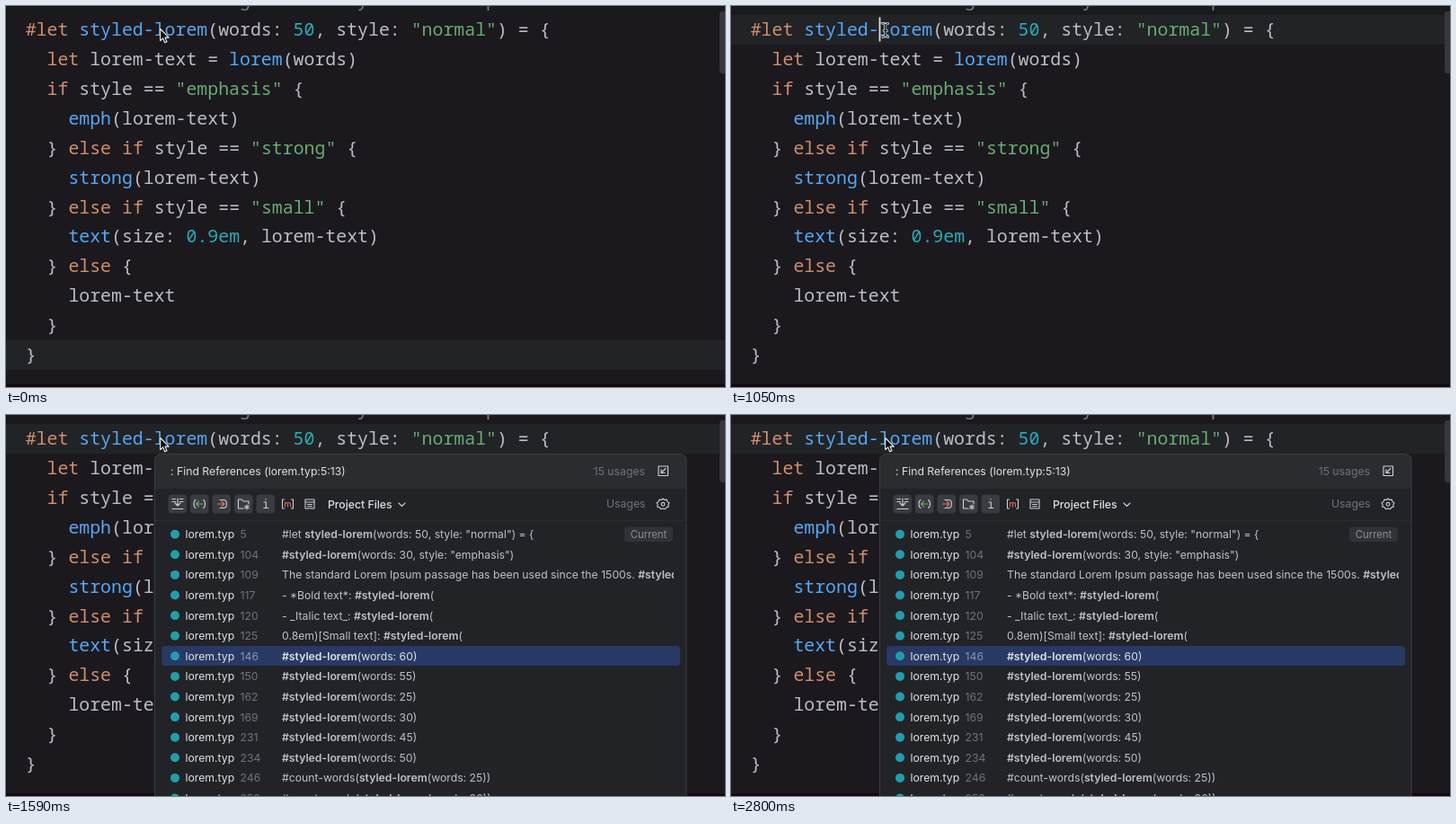
Animation, 800 px wide and 424 px high, one loop 2.84 s. Source, as an HTML page:

```html
<!DOCTYPE html>
<html lang="en">
<head>
<meta charset="utf-8">
<style>
  html, body { margin: 0; width: 100%; height: 100%; overflow: hidden; background: #1b191e; }
  svg { display: block; }
  text { white-space: pre; }
  #code { font: 500 19.87px "Noto Sans Mono", monospace; fill: #bcbec4; }
  #popup { font: 12.24px Inter, sans-serif; fill: #bfc1c7; }
  .bold { font-weight: 600; }
  .dim { fill: #6f737a; }
  .icon { fill: none; stroke: #ced0d6; stroke-width: 1.1; stroke-linecap: round; stroke-linejoin: round; }
  .green { stroke: #5fad65; }
  .orange { stroke: #e0784f; }
</style>
</head>
<body>
<svg width="800" height="424" viewBox="0 0 800 424">
  <rect width="800" height="424" fill="#1b191e"/>
  <rect id="line" width="800" height="33" fill="#212326"/>
  <rect y="421" width="800" height="3" fill="#110b0f"/>
  <g id="code"></g>
  <rect x="794" y="6" width="8" height="69" rx="3" fill="#37373b"/>

  <g id="popup">
    <rect x="165.5" y="43.5" width="591.5" height="400" rx="7" fill="#212327"/>
    <path d="M165.5 82V50.5a7 7 0 0 1 7-7H750a7 7 0 0 1 7 7V82z" fill="#2a2c2f"/>
    <path d="M166 117.5H757" stroke="#2a2c30"/>
    <rect x="165.5" y="43.5" width="591.5" height="400" rx="7" fill="none" stroke="#3b3d42"/>
    <text x="183" y="67" fill="#dfe1e5">: Find References (lorem.typ:5:13)</text>
    <text x="711" y="67" class="dim" text-anchor="end">15 usages</text>
    <text x="358" y="103.5" fill="#dfe1e5" font-weight="500">Project Files</text>
    <text x="711.5" y="103" class="dim" text-anchor="end">Usages</text>

    <g id="toggles" fill="#393b40"></g>
    <g class="icon">
      <path d="M726 57h10.5v10.5h-10.5zM734 59.5l-5 5m0-4v4h4"/>
      <path d="M185 93.5h3.5m5 0h3.5M185 96.5h3.5m5 0h3.5M191 93v8m-3-3l3 3l3-3M185 104.5h12"/>
      <path class="green" d="M219 99h-7.5m3-3l-3 3l3 3"/>
      <path d="M211 94.5q-2 1-2 4.5t2 4.5M219.5 94.5q2 1 2 4.5t-2 4.5"/>
      <path class="orange" d="M235.5 99h7.5m-3-3l3 3l-3 3"/>
      <path d="M238 94.5h4q3.5 0 3.5 4.5t-3.5 4.5h-4"/>
      <path d="M264 104h-5.5v-10h4l1.5 2h6v3M268 100v5m-2.2-3.8l4.4 2.6m0-2.6l-4.4 2.6"/>
      <path d="M287 97h2.3v6.5m-2.5 0h5M289 93.5v.4"/>
      <path d="M309.5 94h-2v10h2M317.5 94h2v10h-2"/>
      <path stroke="#e0605c" d="M310.5 102v-4.5m0 1q1.5-2 3 0v3.5m0-3.5q1.5-2 3 0v3.5"/>
      <path d="M333 94h10v10h-10zM333 97h10M335.5 99.5h5M335.5 101.7h5"/>
      <path d="M437 98l3.5 3.5l3.5-3.5"/>
      <path d="M731 93l1.7 1.5l2.4-.4l.8 2.3l2 1.3l-1 2.1l.3 2.3l-2.3.7l-1.5 1.9l-2.4-.7l-2.4.7l-1.5-1.9l-2.3-.7l.3-2.3l-1-2.1l2-1.3l.8-2.3l2.4.4z"/>
      <circle cx="731" cy="99.3" r="1.9"/>
    </g>

    <rect x="173" y="257" width="577" height="22" rx="4" fill="#283965"/>
    <clipPath id="clip"><rect x="173" y="118" width="570" height="306"/></clipPath>
    <g id="rows" clip-path="url(#clip)"></g>
    <rect x="688" y="124.5" width="54" height="16.5" rx="4" fill="#303236"/>
    <text x="715" y="136.7" font-size="11.3" text-anchor="middle" fill="#8c8f96">Current</text>
  </g>

  <path id="caret" d="M165.5 12.5V39.5" stroke="#dcdde0" stroke-width="1.8"/>
  <defs>
    <path id="beamShape" d="M168.8 19.5q3 0 3 2.5v10q0 2.5-3 2.5M174.8 19.5q-3 0-3 2.5v10q0 2.5 3 2.5M170 27.5h3.6"/>
  </defs>
  <g id="beam" fill="none" stroke-linecap="round">
    <use href="#beamShape" stroke="#e8e8e8" stroke-width="2.6"/>
    <use href="#beamShape" stroke="#111"/>
  </g>
  <path id="arrow" d="M171.7 25.5v13.2l3-2.8l2 4.8l2.3-1l-2-4.6h4.2z" fill="#0b0b0c" stroke="#f2f2f2" stroke-width="1.1" stroke-linejoin="round"/>
</svg>

<script>
const LOOP = 2840, CLICK = 510, OPEN = 1090;
const LEFT = 21.7, CELL = 11.92, PITCH = 32.93;
const $ = id => document.getElementById(id);

const code = `// Text function to generate styled lorem ipsum
#let styled-lorem(words: 50, style: "normal") = {
  let lorem-text = lorem(words)
  if style == "emphasis" {
    emph(lorem-text)
  } else if style == "strong" {
    strong(lorem-text)
  } else if style == "small" {
    text(size: 0.9em, lorem-text)
  } else {
    lorem-text
  }
}`.split('\n');

// Token groups: comment, string, keyword, function call, number
const tokens = /(\/\/.*)|("[^"]*")|(#?\b(?:let|else|if)\b)|([\w-]+(?=\())|(\b\d[\w.]*)/g;
const colors = ['#7a7e85', '#6aab73', '#cf8e6d', '#56a8f5', '#2aacb8'];
const paint = s => s.replace(tokens, (m, ...g) =>
  `<tspan fill="${colors[g.findIndex(Boolean)]}">${m}</tspan>`);

$('code').innerHTML = code.map((s, i) => {
  const body = s.trimStart();
  const x = LEFT + (s.length - body.length) * CELL;
  return `<text x="${x}" y="${i * PITCH}">${paint(body)}</text>`;
}).join('');

$('toggles').innerHTML = [0, 1, 2, 3, 4].map(i =>
  `<rect x="${180.5 + i * 24.5}" y="88.5" width="20.5" height="21" rx="4"/>`).join('');

const usages = [
  [5, '#let styled-lorem(words: 50, style: "normal") = {'],
  [104, '#styled-lorem(words: 30, style: "emphasis")'],
  [109, 'The standard Lorem Ipsum passage has been used since the 1500s. #styled-lorem('],
  [117, '- *Bold text*: #styled-lorem('],
  [120, '- _Italic text_: #styled-lorem('],
  [125, '0.8em)[Small text]: #styled-lorem('],
  [146, '#styled-lorem(words: 60)'],
  [150, '#styled-lorem(words: 55)'],
  [162, '#styled-lorem(words: 25)'],
  [169, '#styled-lorem(words: 30)'],
  [231, '#styled-lorem(words: 45)'],
  [234, '#styled-lorem(words: 50)'],
  [246, '#count-words(styled-lorem(words: 25))'],
  [253, '#count-words(styled-lorem(words: 30))']
];
$('rows').innerHTML = usages.map(([n, s], i) => {
  const y = 132.7 + i * 22.6, base = y + 4.4, selected = n === 146;
  const rich = s.replace(/#?styled-lorem/, '<tspan class="bold">$&</tspan>');
  return `<circle cx="188" cy="${y}" r="5" fill="#239dad"/>
    <text x="199.5" y="${base}" fill="#dfe1e5">lorem.typ</text>
    <text x="260.5" y="${base}" fill="${selected ? '#8d95ab' : '#6f737a'}">${n}</text>
    <text x="307" y="${base}"${selected ? ' fill="#dfe1e5"' : ''}>${rich}</text>`;
}).join('');

const show = (id, on) => $(id).style.display = on ? '' : 'none';

function draw(now) {
  const t = now % LOOP, clicked = t >= CLICK, open = t >= OPEN;
  $('line').setAttribute('y', clicked ? 10 : 372);
  show('popup', open);
  show('caret', clicked && !open);
  show('beam', clicked && !open);
  show('arrow', !clicked || open);
  requestAnimationFrame(draw);
}
draw(performance.now());
</script>
</body>
</html>
```
